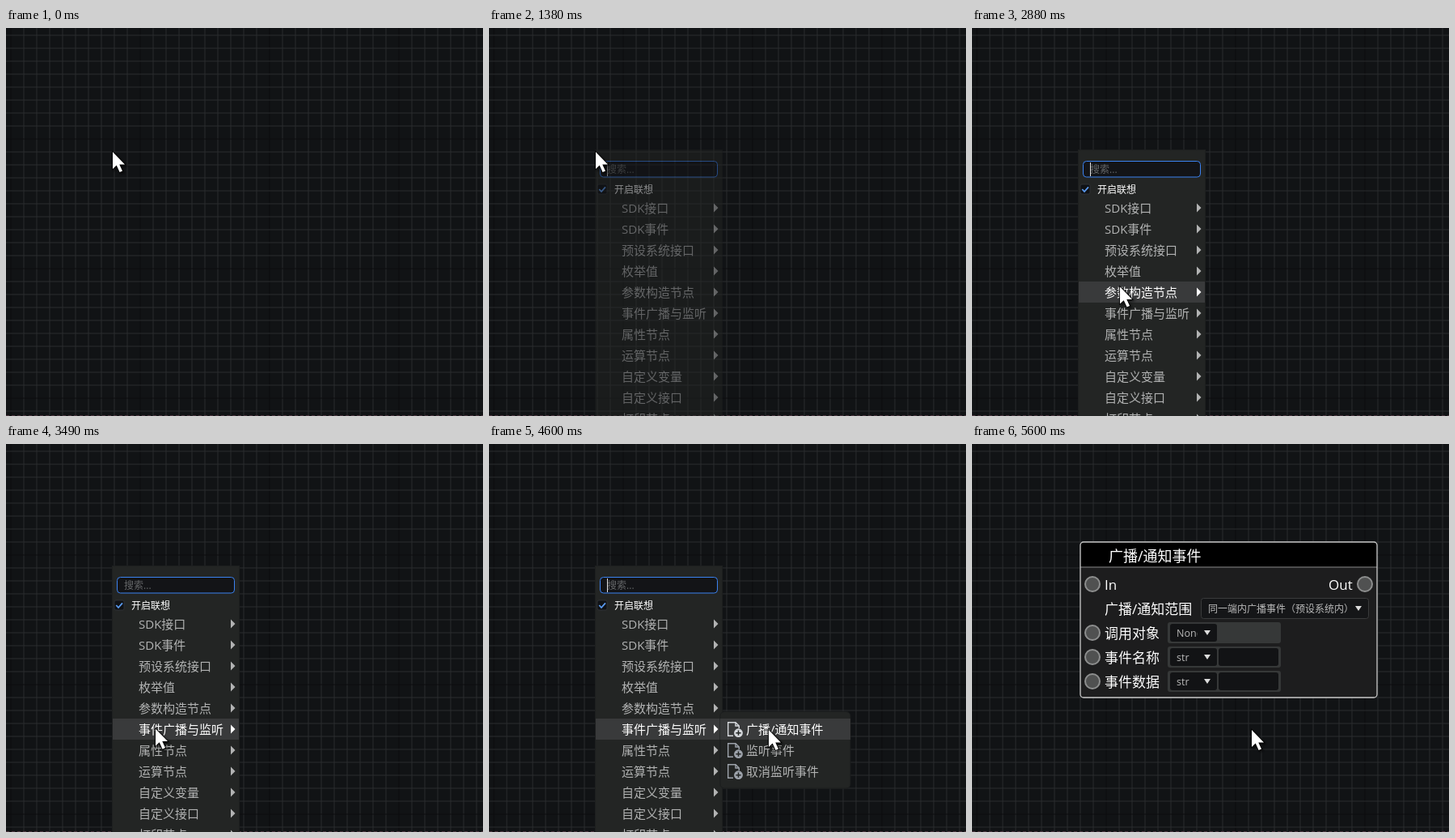
Write an HTML page that moves like this. It is 590x479 px and loops after 7580 ms.

```html
<!DOCTYPE html>
<html lang="zh-CN">
<head>
<meta charset="utf-8">
<title>Node menu</title>
<style>
html, body { margin: 0; width: 100%; height: 100%; overflow: hidden; background: #111315; }
svg { display: block; }
text { font-family: "Open Sans", "Noto Sans CJK SC", "Noto Sans CJK JP", "Noto Sans CJK", sans-serif; white-space: pre; }
.row rect { fill: none; }
.row text, .row .mark { fill: #b2b3b3; }
.row .icon { color: #9da3ab; }
.row.on rect { fill: #393a3b; }
.row.on text, .row.on .mark { fill: #fff; }
.row.on .icon { color: #d5d8dc; }
.port { fill: #505151; stroke: #8d8e8e; stroke-width: 2; }
</style>
</head>
<body>
<svg width="590" height="479" viewBox="0 0 590 479">
  <defs>
    <filter id="shade" x="-50%" y="-50%" width="220%" height="220%">
      <feDropShadow dx="2" dy="2" stdDeviation="1.4" flood-color="#000" flood-opacity=".6"/>
    </filter>
    <clipPath id="noneClip"><rect x="250" y="222" width="28.5" height="22"/></clipPath>
    <g id="doc" fill="none" stroke="currentColor" stroke-width="1.4">
      <path d="M7 17.3H.7V.7H10L14.3 5V8M10 .7V5H14.3"/>
      <circle cx="13.5" cy="13.7" r="5.4" fill="currentColor" stroke="none"/>
      <path d="M13.5 10.6V16.8M10.4 13.7H16.6" stroke="#232524" stroke-width="1.5"/>
    </g>
    <path id="beamShape" d="M-6 -11.5H-3Q0 -11.5 0 -9.5Q0 -11.5 3 -11.5H6M0 -10V10M-6 11.5H-3Q0 11.5 0 9.5Q0 11.5 3 11.5H6"/>
  </defs>
  <rect width="590" height="479" fill="#111315"/>
  <g id="grid"></g>
  <path d="M0 478.5H590" stroke="#4a343e" stroke-dasharray="4 3"/>

  <g id="menu">
    <rect x="131.5" y="150.5" width="157" height="340" fill="#232524" stroke="#1d1f1f"/>
    <rect x="137.5" y="164.5" width="145" height="19.5" rx="4" fill="#131417" stroke="#3b82f0"/>
    <rect x="134" y="193" width="12" height="12" rx="2" fill="#101215" stroke="#34373a" stroke-width=".8"/>
    <path d="M136.3 199L139 202L144 196.3" fill="none" stroke="#5b9bf2" stroke-width="1.8"/>
    <g id="rows"></g>
    <path id="caret" d="M146.5 166V183" stroke="#e4e4e4"/>
  </g>

  <g id="sub">
    <rect x="286" y="330.5" width="161" height="94.5" rx="5" fill="#232524" stroke="#1b1d1d"/>
    <g id="subRows"></g>
  </g>

  <g id="node">
    <rect x="134" y="121" width="367" height="192" rx="4" fill="#1d1d1e"/>
    <path d="M134 152V125a4 4 0 0 1 4-4H497a4 4 0 0 1 4 4V152Z" fill="#000"/>
    <path d="M134 152H501" stroke="#8a8a8a"/>
    <rect x="134" y="121" width="367" height="192" rx="4" fill="none" stroke="#c8c8c8" stroke-width="1.3"/>
    <g id="fields"></g>
  </g>

  <g id="arrow" filter="url(#shade)">
    <path d="M0 0V21L4.7 16.6L8.6 25L12 23.4L8.3 15.4H15Z" fill="#fff" stroke="#000" stroke-width="1.6" paint-order="stroke"/>
  </g>
  <g id="beam" fill="none" stroke-linecap="square">
    <use href="#beamShape" stroke="#000" stroke-width="4"/>
    <use href="#beamShape" stroke="#fff" stroke-width="2" stroke-linecap="butt"/>
  </g>
  <circle id="click" r="15" fill="#ff0" fill-opacity=".47"/>
</svg>
<script>
const LOOP = 7580;
const $ = id => document.getElementById(id);
const add = (id, markup) => $(id).insertAdjacentHTML('beforeend', markup);
const label = (x, mid, size, text, extra = '') =>
  `<text x="${x}" y="${Math.round(mid + size * 0.38)}" font-size="${size}" ${extra}>${text}</text>`;
const box = (x, y, w, h, fill, extra = '') =>
  `<rect x="${x}" y="${y}" width="${w}" height="${h}" rx="3" fill="${fill}" ${extra}/>`;
const port = (x, y) => `<circle class="port" cx="${x}" cy="${y}" r="9"/>`;
const down = (x, y) => `<path d="M${x} ${y}h8l-4 6z" fill="#dcdcdc"/>`;
const row = (x, mid, w, content) =>
  `<g class="row"><rect x="${x}" y="${mid - 13}" width="${w}" height="26"/>${content}</g>`;

// Every tenth grid line is dark; lines straddle two pixels
function gridLines(size, start, toPath) {
  for (let p = start, i = 0; p < size; p += 16, i++) {
    add('grid', `<path d="${toPath(p)}" stroke="${i % 10 ? '#2a2c2e' : '#0c0d0f'}"/>`);
  }
}
gridLines(590, 6, x => `M${x} 0V479`);
gridLines(479, -23, y => `M0 ${y}H590`);

add('rows', label(146, 174.5, 12, '搜索...', 'fill="#66686a"') + label(155, 199, 12, '开启联想', 'fill="#fff"'));
const items = ['SDK接口', 'SDK事件', '预设系统接口', '枚举值', '参数构造节点', '事件广播与监听',
  '属性节点', '运算节点', '自定义变量', '自定义接口', '打印节点'];
items.forEach((name, i) => {
  const mid = 222 + 26 * i;
  add('rows', row(132, mid, 156, label(164, mid, 15, name) +
    `<path class="mark" d="M278 ${mid - 5.5}l5.5 5.5l-5.5 5.5z"/>`));
});
['广播/通知事件', '监听事件', '取消监听事件'].forEach((name, i) => {
  const mid = 352 + 26 * i;
  add('subRows', row(286, mid, 161, label(318, mid, 15, name) +
    `<use href="#doc" class="icon" x="295" y="${mid - 9}"/>`));
});

const white = 'fill="#fff"', grey = 'fill="#b9b9b9"';
add('fields', label(169, 138.5, 18, '广播/通知事件', white) +
  port(149, 173) + port(486, 173) +
  label(164, 173.5, 17, 'In', white) + label(441, 173.5, 17, 'Out', white) +
  label(164, 204, 17, '广播/通知范围', white) +
  box(283.5, 190.5, 207, 25, '#151618', 'stroke="#3a3b3c"') +
  label(292, 203.5, 12, '同一端内广播事件（预设系统内）', grey) + down(474, 200));
['调用对象', '事件名称', '事件数据'].forEach((name, i) => {
  const mid = 233 + 30 * i;
  add('fields', port(149, mid) + label(164, mid + 1, 17, name, white) +
    box(242, mid - 13, 140, 26, '#363838') + box(245, mid - 11, 58, 22, '#121315') +
    (i ? label(253, mid + 0.5, 12.5, 'str', grey) + box(305, mid - 11, 74, 22, '#121315')
       : label(253, mid + 0.5, 12.5, 'None', grey + ' clip-path="url(#noneClip)"')) +
    down(287, mid - 3));
});

// Pointer key points; power shapes the easing of the move that ends there
const moves = [
  { t: 2050, x: 132, y: 153 },
  { t: 2330, x: 170, y: 168, power: 1 },
  { t: 2880, x: 183, y: 319, power: 2 },
  { t: 3230, x: 185, y: 351, power: 0.7 },
  { t: 3600, x: 185, y: 352, power: 1 },
  { t: 4180, x: 285, y: 352, power: 1.4 },
  { t: 4600, x: 346, y: 353, power: 0.8 }
];
const ramp = (t, from, to) => Math.min(1, Math.max(0, (t - from) / (to - from)));

function pointer(t) {
  let { x, y } = moves[0];
  for (let i = 1; i < moves.length; i++) {
    const end = moves[i];
    const k = ramp(t, moves[i - 1].t, end.t) ** end.power;
    x += (end.x - x) * k;
    y += (end.y - y) * k;
  }
  return { x, y };
}

const show = (id, on) => $(id).setAttribute('visibility', on ? 'visible' : 'hidden');
const place = (id, x, y) => $(id).setAttribute('transform', `translate(${x} ${y})`);
const mainRows = [...document.querySelectorAll('#rows .row')];
const subRows = [...document.querySelectorAll('#subRows .row')];

function draw(t) {
  const { x, y } = pointer(t);
  const inField = t >= 2260 && t < 2530;
  const inSub = x > 286;
  const active = inSub ? 5 : inField ? -1 : Math.floor((y - 209) / 26);
  mainRows.forEach((r, i) => r.classList.toggle('on', i === active));
  subRows.forEach((r, i) => r.classList.toggle('on', inSub && i === 0));

  const fadeOut = 1 - ramp(t, 5400, 5600);
  $('menu').setAttribute('opacity', ramp(t, 1250, 1510) * fadeOut);
  $('sub').setAttribute('opacity', ramp(t, 3560, 3820) * fadeOut);
  show('caret', t >= 1380 && t < 5600 && (t - 1380) % 1070 < 540);
  show('node', t >= 5600);

  show('arrow', !inField);
  show('beam', inField);
  show('click', (t >= 920 && t < 1250) || (t >= 5330 && t < 5400));
  place('arrow', x, y);
  place('beam', x, y);
  place('click', x - 1, y - 3);
}

const start = performance.now();
function tick() {
  draw((performance.now() - start) % LOOP);
  requestAnimationFrame(tick);
}
draw(0);
requestAnimationFrame(tick);
</script>
</body>
</html>
```
